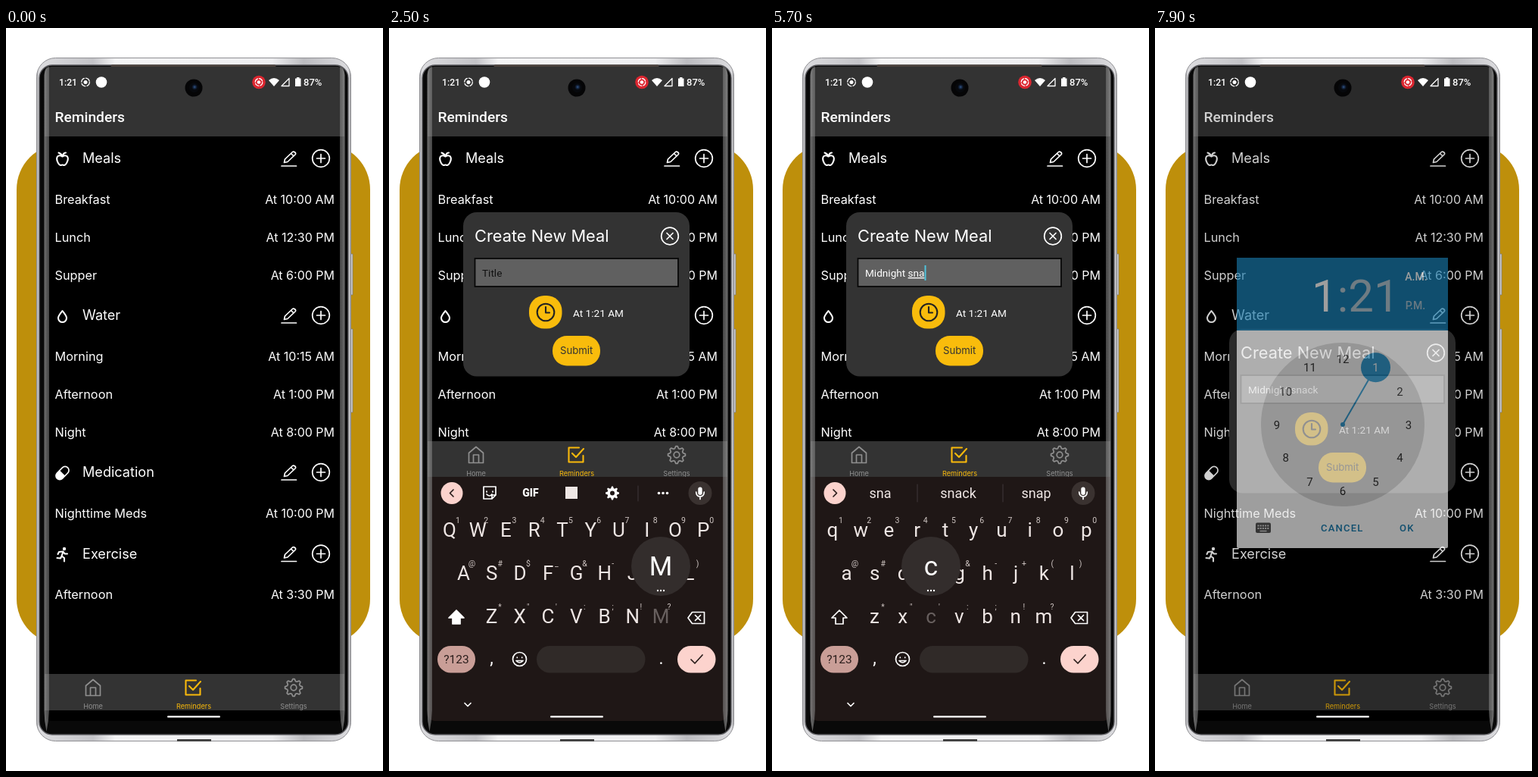
Write an HTML page that moves like this. It is 498x980 px and loops after 8 s.

```html
<!DOCTYPE html>
<html lang="en">
<head>
<meta charset="utf-8">
<title>Reminders</title>
<style>
html, body { margin: 0; width: 100%; height: 100%; overflow: hidden; background: #fff; }
svg { display: block; width: 498px; height: 980px; }
text { font-family: Roboto, "Open Sans", sans-serif; fill: #fff; white-space: pre; }
.round { font-family: Inter, Lato, sans-serif; }
.mid { text-anchor: middle; }
.end { text-anchor: end; }
.line { fill: none; stroke: #fff; stroke-width: 1.7; stroke-linecap: round; stroke-linejoin: round; }
.bold { stroke-width: 2.1; }
.gray { stroke: #8f8f8f; }
.gold { stroke: #f9b90b; }
.dark { stroke: #2a1d1b; }
.key { font-size: 26px; fill: #eee6e4; }
.hint { font-size: 10.5px; fill: #cfc6c3; }
.chip { font-size: 18px; fill: #f0e8e6; }
</style>
</head>
<body>
<svg id="stage" viewBox="0 0 498 980" xmlns="http://www.w3.org/2000/svg">
  <defs>
    <linearGradient id="silver">
      <stop offset="0" stop-color="#8d8d90"/><stop offset=".006" stop-color="#dcdcdf"/>
      <stop offset=".18" stop-color="#c4c4c8"/><stop offset=".25" stop-color="#f4f4f5"/>
      <stop offset=".75" stop-color="#eeeef0"/><stop offset=".85" stop-color="#bcbcc0"/>
      <stop offset=".994" stop-color="#dcdcdf"/><stop offset="1" stop-color="#8d8d90"/>
    </linearGradient>
    <linearGradient id="edge">
      <stop offset="0" stop-color="#aaa" stop-opacity=".65"/><stop offset="1" stop-color="#888" stop-opacity=".5"/>
    </linearGradient>
    <radialGradient id="lens" cx=".55" cy=".45">
      <stop offset="0" stop-color="#35588a"/><stop offset=".3" stop-color="#142540"/><stop offset=".6" stop-color="#07090d"/>
    </radialGradient>
    <clipPath id="screen"><rect x="51" y="51" width="396" height="863" rx="9"/></clipPath>
    <clipPath id="app"><rect x="51" y="51" width="396" height="849"/></clipPath>
    <path id="glare" d="M0 62Q1 51 6.500 51V900Q6 914 3 928Q0 914 0 900Z" fill="url(#edge)"/>
    <g id="plus" class="line"><circle r="11.300"/><path d="M-5.500 0H5.500M0-5.500V5.500"/></g>
    <g id="pencil" class="line"><path d="M-10 10H9.500M-6.500 5.500-5.500 1 4.500-8.500Q6-9.500 7.700-8T8-5L-2 4.500ZM2.500-6.500 6-3"/></g>
    <g id="mic"><circle r="15.500" fill="#3a3230"/><rect x="-2.700" y="-8" width="5.400" height="10.500" rx="2.700" fill="#fff"/>
      <path class="line" d="M-5.300-1.500Q-5 4.500 0 4.500T5.300-1.500M0 5V8"/></g>
    <g id="face"><circle r="9" fill="#fdc62f"/><path d="M-5-2Q-3.500-4.500-2-2M2-2Q3.500-4.500 5-2" fill="none" stroke="#6b3c12" stroke-width="1.400"/></g>
  </defs>

  <rect x="14" y="153" width="467" height="660" rx="60" fill="#be8f0b"/>
  <path d="M455 298h3v54h-3zM455 397h3v110h-3z" fill="#c9c9cc" stroke="#77777a" stroke-width=".7"/>
  <rect x="40.500" y="39.500" width="415" height="901" rx="25" fill="url(#silver)" stroke="#909094"/>
  <path d="M226 938h45v3h-45z" fill="#444"/>
  <rect x="44" y="49" width="408" height="883" rx="17" fill="#090909" stroke="#5c5c60" stroke-width="1.400"/>
  <path d="M140 50H355" stroke="#4c423d" stroke-width="3" stroke-linecap="round"/>

  <g clip-path="url(#screen)">
    <rect x="51" y="51" width="396" height="863"/>
    <g id="list"></g>
    <rect x="51" y="51" width="396" height="92" fill="#333"/>
    <text x="64.500" y="124" font-size="19.200" font-weight="500">Reminders</text>
    <g id="nav"></g>
    <g clip-path="url(#app)"><g id="modal"></g></g>
    <g id="keyboard"></g>
    <rect id="dim" x="51" y="51" width="396" height="863" opacity="0"/>
    <g id="picker"></g>
    <g id="status"></g>
    <rect x="213" y="907.300" width="70" height="2.200" rx="1.100" fill="#fff"/>
  </g>
  <use href="#glare" x="50.500"/>
  <use href="#glare" transform="translate(447.500 0) scale(-1 1)"/>
  <circle cx="248" cy="79" r="11.500" fill="#050506"/>
  <circle cx="248.500" cy="78.500" r="6.500" fill="url(#lens)"/>
</svg>
<script>
const $ = id => document.getElementById(id);
const text = (x, y, s, size, cls = '', extra = '') =>
  `<text x="${x}" y="${y}" font-size="${size}" class="${cls}" ${extra}>${s}</text>`;
const line = (d, cls = '', extra = '') => `<path class="line ${cls}" d="${d}" ${extra}/>`;
const at = (x, y, body) => `<g transform="translate(${x} ${y})">${body}</g>`;
const use = (id, x, y) => `<use href="#${id}" x="${x}" y="${y}"/>`;
const show = (id, on) => { $(id).style.display = on ? '' : 'none'; };
const move = (id, y) => $(id).setAttribute('transform', `translate(0 ${y})`);

function gear(outer, inner) {
  const pts = [];
  for (let i = 0; i < 32; i++) {
    const r = i % 4 < 2 ? outer : inner, a = (i - .5) * Math.PI / 16;
    pts.push(`${(r * Math.cos(a)).toFixed(2)} ${(r * Math.sin(a)).toFixed(2)}`);
  }
  return `M${pts.join('L')}Z`;
}

// Reminder list
const icons = {
  apple: line('M0-3.500Q-4-6-6.500-3.500C-9 0-5 8-2 8Q0 7 2 8C5 8 9 0 6.500-3.500Q4-6 0-3.500ZM0-4Q-1-7-5-8.500M1-6Q2-8.500 4.500-8.500', 'bold'),
  drop: line('M0-7C-2-4-5.500-.5-5.500 2.500A5.500 5.500 0 0 0 5.500 2.500C5.500-.5 2-4 0-7Z', 'bold'),
  pill: `<g transform="rotate(-45)"><rect class="line" x="-10" y="-5" width="20" height="10" rx="5"/>
    <path d="M0-5H-5A5 5 0 0 0-5 5H0Z" fill="#fff"/></g>`,
  runner: '<circle cx="2.500" cy="-7.500" r="2.200" fill="#fff"/>' +
    line('M-6-.5-4.500-3.500 1-4-1 2 2.500 4.500V9M-1 2-2.500 5-7 4.500M1-4 3-1H6.500', 'bold')
};
const sections = [
  ['Meals', 'apple', 172, ['Breakfast', '10:00 AM', 'Lunch', '12:30 PM', 'Supper', '6:00 PM']],
  ['Water', 'drop', 379, ['Morning', '10:15 AM', 'Afternoon', '1:00 PM', 'Night', '8:00 PM']],
  ['Medication', 'pill', 586, ['Nighttime Meds', '10:00 PM']],
  ['Exercise', 'runner', 693.5, ['Afternoon', '3:30 PM']]
];
$('list').innerHTML = sections.map(([name, icon, y, items]) => {
  let out = at(74.5, y + 1, icons[icon]) + text(101, y + 6, name, 18.1, 'round') +
    use('pencil', 374, y) + use('plus', 416, y);
  for (let i = 0; i < items.length; i += 2) {
    const base = y + 59.5 + i * 25;
    out += text(64.5, base, items[i], 16.3, 'round') + text(434, base, 'At ' + items[i + 1], 16, 'round end');
  }
  return out;
}).join('');

$('nav').innerHTML = '<rect x="51" y="852" width="396" height="48" fill="#333"/>' +
  at(115, 870, line('M-9.500-2.500 0-10.500 9.500-2.500V10.500H-9.500ZM-3.500 10.500V0H3.500V10.500', 'gray')) +
  at(247, 870, line('M4-9.500H-9.500V9.500H9.500V1M-5-2 0 3 10-8', 'gold bold')) +
  at(380, 870, line(gear(11.5, 8.7), 'gray') + '<circle class="line gray" r="3.800"/>') +
  text(115, 898, 'Home', 9.2, 'round mid', 'style="fill:#8f8f8f"') +
  text(248, 898, 'Reminders', 9.2, 'round mid', 'style="fill:#f9b90b"') +
  text(380, 898, 'Settings', 9.2, 'round mid', 'style="fill:#8f8f8f"');

$('status').innerHTML = text(70, 76, '1:21', 12.2, '', 'font-weight="500"') +
  at(105, 71.5, '<circle r="2.500" fill="#fff"/><circle class="line" r="5.300" stroke-dasharray="6 2.300" style="stroke-width:1.3"/>') +
  '<circle cx="126" cy="71.500" r="7.300" fill="#fff"/>' +
  at(334, 71.5, '<circle r="8.800" fill="#dc2630"/><circle r="2.300" fill="#fff"/><circle class="line" r="4.800" stroke-dasharray="5.500 2" style="stroke-width:1.2"/>') +
  '<path d="M347 69Q354 63 361 69L354 77Z" fill="#fff"/>' +
  line('M364 76.500 374 66.500V76.500Z', '', 'style="stroke-width:1.3"') +
  '<path d="M384 65h3.500v1.500h2V77h-7.500V66.500h2z" fill="#fff"/>' + text(393, 76, '87%', 13, '', 'font-weight="500"');

// Dialog
$('modal').innerHTML = `<rect x="98" y="397" width="299" height="216.500" rx="18" fill="#333"/>` +
  text(113, 435.5, 'Create New Meal', 21.8, 'round') +
  at(371, 428.5, '<circle class="line" r="11.300"/>' + line('M-4-4 4 4M4-4-4 4')) +
  '<rect x="113.500" y="458" width="268.500" height="37" fill="#606060" stroke="#080808" stroke-width="1.800"/>' +
  text(123, 482, 'Title', 13.6, '', 'id="hint" style="fill:#111"') +
  '<text id="entry" x="123" y="482" font-size="13.600"><tspan id="fixed"></tspan><tspan id="word" text-decoration="underline"></tspan></text>' +
  '<rect id="caret" y="467" width="2" height="20" fill="#50c4dc"/>' +
  '<rect x="185" y="507" width="43.500" height="43.500" rx="20" fill="#f9bc0c"/>' +
  at(207, 529, '<circle class="line bold" r="11.300" style="stroke:#222"/>' + line('M0-7V0.500H5', 'bold', 'style="stroke:#222"')) +
  text(243, 535, 'At 1:21 AM', 13.6) +
  '<rect x="216" y="560" width="63" height="39.500" rx="19" fill="#f9bc0c"/>' +
  text(247.7, 584.3, 'Submit', 13.2, 'round mid', 'style="fill:#333"');

// Keyboard
const rows = [
  ['qwertyuiop', '1234567890', 80, 671],
  ['asdfghjkl', '@#$_&-+()', 98.5, 728],
  ['zxcvbnm', '*"\':;!?', 135.5, 785]
];
const keyPos = {};
let keys = '';
for (const [letters, marks, x0, y] of rows) {
  [...letters].forEach((c, i) => {
    const x = x0 + i * 37.25;
    keyPos[c] = [x, y];
    keys += `<text class="key mid" data-key="${c}" x="${x}" y="${y}">${c}</text>` +
      `<text class="hint mid" x="${x + 11}" y="${y - 18}">${marks[i].replace('&', '&amp;')}</text>`;
  });
}
const tools = at(133, 613, line('M-8-8H8V3L3 8H-8ZM3 8V3H8M-4-2V-1M4-2V-1M-4 2Q0 6 3 2')) +
  text(187, 618, 'GIF', 14, 'mid', 'font-weight="900"') +
  '<rect x="233" y="605" width="16" height="16" fill="#eee6e4"/>' +
  at(295, 613.5, `<path d="${gear(9, 6.5)}" fill="#fff"/><circle r="3" fill="#1f1716"/>`) +
  line('M329 604V624', '', 'style="stroke:#40383a;stroke-width:1"') +
  [-5.5, 0, 5.5].map(d => `<circle cx="${362 + d}" cy="613.500" r="1.800" fill="#fff"/>`).join('');

$('keyboard').innerHTML = '<rect x="51" y="592" width="396" height="330" fill="#1f1716"/>' +
  `<circle cx="83" cy="613.500" r="14.500" fill="#fcd3cd"/>` + line('', 'dark', 'id="arrow"') +
  `<g id="tools">${tools}</g><g id="chips"></g>` + use('mic', 411, 613.5) + keys +
  line('M89 768 99 778H94V786H84V778H79Z', '', 'id="shift"') +
  at(406, 778, line('M-11 0-5.500-7.500H10.500V7.500H-5.500ZM-1.500-3.500 5.500 3.500M5.500-3.500-1.500 3.500')) +
  '<rect x="64" y="815" width="50" height="35.500" rx="17.500" fill="#c99e97"/>' +
  text(89, 838, '?123', 15.5, 'mid', 'style="fill:#2a1d1b"') +
  text(135.5, 839, ',', 23, 'mid') +
  at(172.5, 832.5, '<circle class="line" r="9"/>' + line('M-3.200-2.500V-2M3.200-2.500V-2M-4.500 2Q0 7 4.500 2Z')) +
  '<rect x="195" y="815" width="143.500" height="35.500" rx="17.500" fill="#302a28"/>' +
  text(359.5, 839, '.', 23, 'mid') +
  '<rect x="381" y="815" width="50.500" height="35.500" rx="17.500" fill="#fcd3cd"/>' +
  line('M399 833 404 838 414 827', 'dark') + line('M100 890.500 104 894.500 108 890.500') +
  `<g id="popup"><circle r="39" fill="#332d2c"/><text id="big" class="mid" y="12" font-size="35"></text>
   ${[-4, 0, 4].map(x => `<circle cx="${x}" cy="32" r="1.200" fill="#fff"/>`).join('')}</g>`;

// Time picker
const blue = '#1b7fb2';
let dial = '';
for (let h = 1; h <= 12; h++) {
  const a = h * Math.PI / 6;
  dial += text(248 + 87 * Math.sin(a), 528.5 - 87 * Math.cos(a), h, 15, 'mid', `style="fill:${h === 1 ? '#ddd' : '#1c1c1c'}"`);
}
$('picker').innerHTML = `<rect x="108" y="303" width="279" height="383" rx="2" fill="#fff"/>
  <path d="M108 303H387V399H108Z" fill="${blue}"/>` +
  '<text x="207" y="374" font-size="60">1<tspan fill="#b4c8d4">:21</tspan></text>' +
  text(345, 333, 'A.M.', 14, 'mid', 'font-weight="500"') +
  text(344, 371, 'P.M.', 14, 'mid', 'font-weight="500" style="fill:#a9c3d2"') +
  `<circle cx="248" cy="523" r="108" fill="#d8d8d8"/><circle cx="248" cy="523" r="3" fill="${blue}"/>
  <path d="M248 523 291.500 447.700" stroke="${blue}" stroke-width="2"/><circle cx="291.500" cy="447.700" r="19.500" fill="${blue}"/>` + dial +
  '<rect x="133" y="652.500" width="20" height="13.500" rx="2" fill="#555"/>' +
  '<path d="M135.500 656.500H151M135.500 660H151" stroke="#ddd" stroke-width="1.800" stroke-dasharray="2 1.200"/><path d="M138.500 663.500H147.500" stroke="#ddd" stroke-width="1.500"/>' +
  text(219, 664, 'CANCEL', 13, '', `font-weight="500" letter-spacing="1.200" style="fill:${blue}"`) +
  text(323, 664, 'OK', 13, '', `font-weight="500" letter-spacing="1.200" style="fill:${blue}"`);

// Timeline: [start, fixed text, word in progress, suggestions]
const typing = [
  [1900, '', '', null],
  [2600, '', 'M', ['M', 'My', 'Me']],
  [3000, '', 'Mi', ['Mi', 'Mine', 'Miss']],
  [3300, '', 'Mid', ['Mid', 'Middle', 'Midnight']],
  [3700, '', 'Midn', ['Midn', 'Midnight', 'Mid']],
  [4000, '', 'Midni', ['Midni', 'Midnight', 'Midst']],
  [4300, 'Midnight', '', ['on', 'and']],
  [4800, 'Midnight ', 's', ['s', 'so', 'she']],
  [5100, 'Midnight ', 'sn', ['sn', 'snack', 'snow']],
  [5400, 'Midnight ', 'sna', ['sna', 'snack', 'snap']],
  [5800, 'Midnight ', 'snac', ['snac', 'snack', 'snacks']],
  [6100, 'Midnight ', 'snack', ['snack', 'snacks', 'snacking']],
  [6500, 'Midnight snack', '', []]
];
const presses = [
  [2400, 2600, 'm'], [2800, 3000, 'i'], [3100, 3300, 'd'], [3500, 3700, 'n'], [3800, 4000, 'i'],
  [4600, 4800, 's'], [4900, 5100, 'n'], [5200, 5400, 'a'], [5600, 5800, 'c'], [5900, 6100, 'k']
];
// Steps of [start, value...]; the last one reached holds
const slide = [[0, 600], [1000, 430], [1100, 210], [1200, 55], [1300, 0]];
const board = [[0, 0, 0], [1800, 110, .15], [1900, 42, .55], [2000, 8, .92], [2100, 0, 1],
  [7000, 10, .9], [7100, 42, .58], [7200, 0, 0]];
const fade = [[0, 0], [7700, .06], [7800, .32], [7900, .62]];
const pick = (steps, t) => steps.filter(s => s[0] <= t).pop() || steps[0];

function chips(words) {
  if (!words || !words.length) return '';
  const emoji = words.length === 2;
  const bars = emoji ? [192, 302, 350] : [192, 305];
  return words.map((w, i) => `<text class="chip mid" x="${143 + i * 103}" y="620">${w}</text>`).join('') +
    bars.map(x => line(`M${x} 602V625`, '', 'style="stroke:#40383a;stroke-width:1"')).join('') +
    (emoji ? use('face', 326, 614) + use('face', 375, 614) +
      '<path d="M320.500 615H331.500Q330 621 326 621T320.500 615Z" fill="#6b3c12"/><path d="M317 614h4v4h-4zM331 614h4v4h-4z" fill="#42a8f0"/>' +
      line('M371 616Q375 620 379 616', '', 'style="stroke:#6b3c12;stroke-width:1.300"') : '');
}

let last = -1;
function draw(t) {
  const [since, fixed, word, words] = pick(typing, t);
  const [, drop, alpha] = pick(board, t);
  const raised = t >= 2100 && t < 6900;
  const upper = t < 2600;

  show('modal', t >= 1000);
  move('modal', raised ? -154 : pick(slide, t)[1]);
  move('nav', raised ? -307 : 0);
  move('keyboard', drop);
  $('keyboard').setAttribute('opacity', alpha);

  $('fixed').textContent = fixed;
  $('word').textContent = word;
  show('hint', !fixed && !word);
  const reset = t < 1900 ? 1300 : since;
  show('caret', t < 6500 && (t - reset) % 1000 < 500);
  $('caret').setAttribute('x', 122.5 + (fixed || word ? $('entry').getComputedTextLength() + .5 : 0));

  show('tools', !words);
  $('chips').innerHTML = chips(words);
  $('arrow').setAttribute('d', words ? 'M81 609 85.500 613.500 81 618' : 'M85 609 80.500 613.500 85 618');
  $('shift').style.fill = upper ? '#fff' : 'none';

  const hit = presses.find(p => t >= p[0] && t < p[1]);
  document.querySelectorAll('[data-key]').forEach(k => {
    const c = k.dataset.key;
    k.textContent = upper ? c.toUpperCase() : c;
    k.style.opacity = hit && hit[2] === c ? .35 : 1;
  });
  show('popup', hit);
  if (hit) {
    const [x, y] = keyPos[hit[2]];
    $('popup').setAttribute('transform', `translate(${x} ${y - 75})`);
    $('big').textContent = upper ? hit[2].toUpperCase() : hit[2];
  }

  const p = pick(fade, t)[1];
  $('picker').setAttribute('opacity', p);
  $('dim').setAttribute('opacity', p * .3);
}

const start = performance.now();
function tick() {
  const t = Math.floor((performance.now() - start) % 8000 / 100) * 100;
  if (t !== last) draw(last = t);
  requestAnimationFrame(tick);
}
tick();
</script>
</body>
</html>
```
